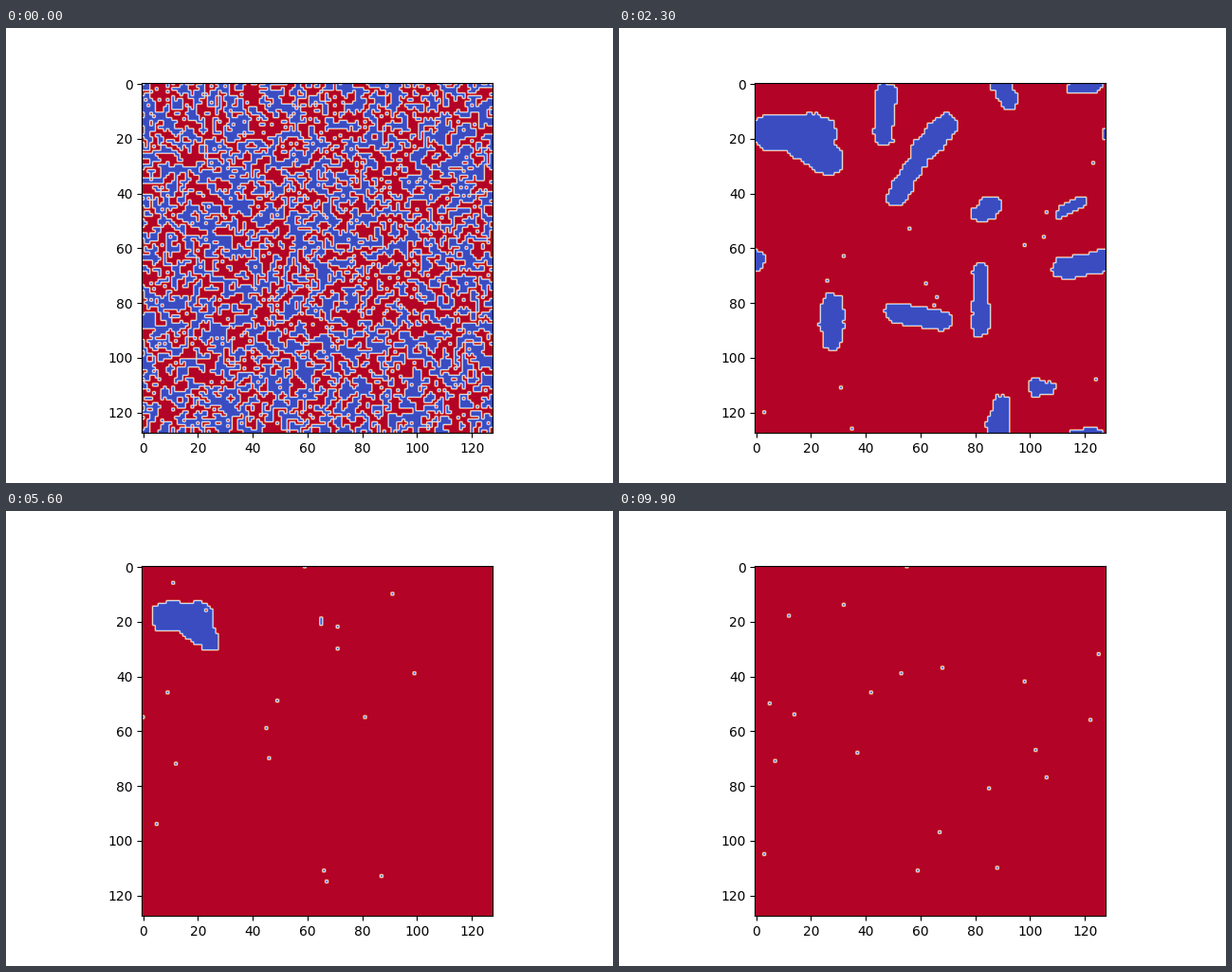
A matplotlib script that plays this animation: 640 by 480 pixels, repeating every 10 s.

```python
import numpy as np
import matplotlib.pyplot as plt
from matplotlib.animation import FuncAnimation

# Ising model on a periodic lattice, quenched from a random start.
# A weak field favours red; a few long-lived blue domains are held and shrink slowly.
N = 128
FRAMES = 100
BETA = 0.87
VISITED = 0.6

Y, X = np.mgrid[:N, :N]

# Long-lived domains: centre x, y, half axis dx, dy, lifetime in frames
DOMAINS = [
    (14, 18, 10, 0, 99), (20, 24, 8, 5, 80), (47, 11, -1, 11, 46),
    (65, 20, 6, -6, 57), (55, 35, 6, -10, 42), (90, 2, 4, 7, 44),
    (120, 1, 6, -1, 36), (84, 46, 3, -2, 46), (115, 45, 8, -5, 30),
    (120, 66, 10, -2, 52), (28, 87, 0, 8, 52), (59, 85, 12, 2, 46),
    (82, 79, 0, 18, 36), (104, 111, 4, 0, 36), (89, 122, -1, 7, 42),
]


def wrap(d):
    return (d + N / 2) % N - N / 2


def depth(k):
    """Signed distance to the rim of the domains at frame k, positive inside."""
    d = np.full((N, N), -N, dtype=float)
    for x, y, dx, dy, life in DOMAINS:
        if k >= life:
            continue
        # Area falls at a steady rate, so lengths follow a square root.
        scale = np.sqrt(1 - k / life)
        radius = 0.75 * np.sqrt(life - k)
        px, py = wrap(X - x), wrap(Y - y)
        u = (px * dx + py * dy) / (dx * dx + dy * dy)
        u = np.clip(u, -scale, scale)
        d = np.maximum(d, radius - np.hypot(px - u * dx, py - u * dy))
    return d


def sweep(spins, field, rng):
    """One Metropolis pass; the field acts on domain walls only."""
    for parity in (0, 1):
        near = sum(np.roll(spins, step, axis) for step in (1, -1) for axis in (0, 1))
        local = near + np.where(np.abs(near) < 4, field, 0)
        cost = 2 * spins * local
        flip = (X + Y) % 2 == parity
        flip &= rng.random((N, N)) < VISITED
        flip &= rng.random((N, N)) < np.exp(-BETA * cost)
        spins = np.where(flip, -spins, spins)
    return spins


def simulate():
    rng = np.random.default_rng(12)
    spins = np.where(rng.random((N, N)) < 0.52, 1, -1)
    spins = sweep(spins, 0, rng)
    states = [spins]
    for k in range(1, FRAMES):
        bias = 0.35 + 0.05 * k
        field = -np.clip(1.5 * depth(k), -min(bias, 2), 2)
        for _ in range(2):
            spins = sweep(spins, field, rng)
        states.append(spins)
    return states


states = simulate()

fig, ax = plt.subplots(figsize=(6.4, 4.8), dpi=100)
image = ax.imshow(states[0], cmap="coolwarm", vmin=-1, vmax=1)


def update(k):
    image.set_data(states[k])
    return [image]


anim = FuncAnimation(fig, update, frames=FRAMES, interval=100, repeat=True,
                     repeat_delay=0)
plt.show()
```
